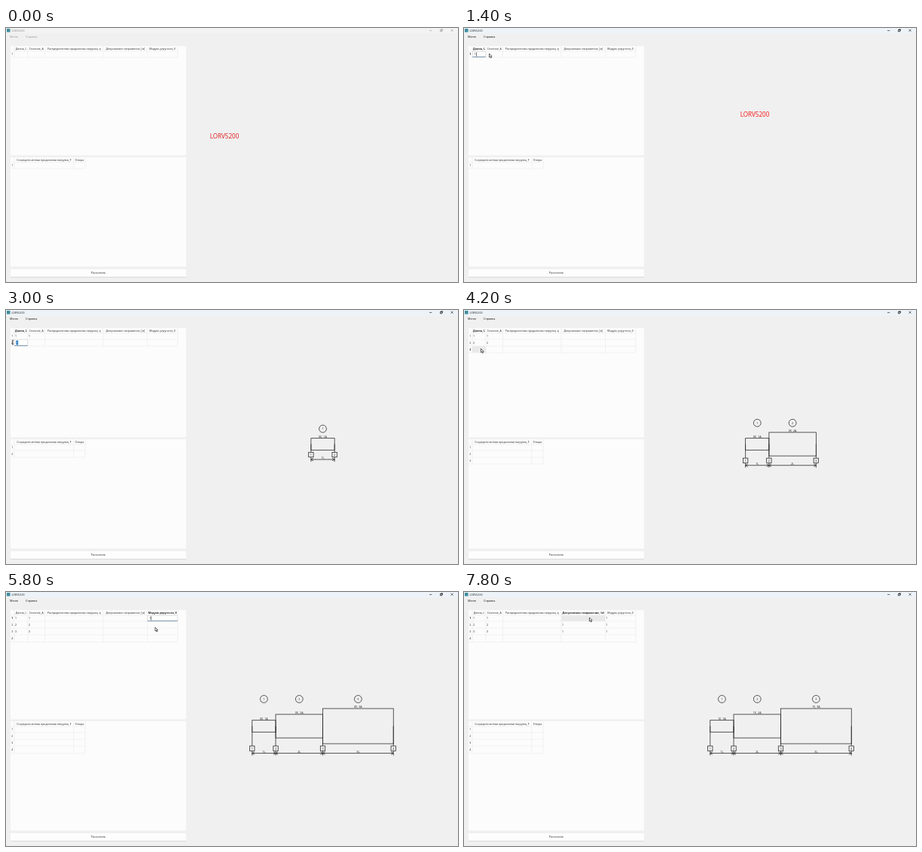
Animation of 600 by 338 pixels, one loop 8000 ms. Source, as an HTML page with a canvas:

```html
<!DOCTYPE html>
<html lang="ru">
<head>
<meta charset="utf-8">
<title>LORV5200</title>
<style>
html, body { margin: 0; width: 100%; height: 100%; overflow: hidden; background: #f0f0f0; }
canvas { display: block; width: 600px; height: 338px; }
</style>
</head>
<body>
<canvas id="stage"></canvas>
<script>
const LOOP = 8000, TICK = 200;
const APP = 'LORV5200';
const canvas = document.getElementById('stage');
const ctx = canvas.getContext('2d');
const ratio = window.devicePixelRatio || 1;
canvas.width = 600 * ratio;
canvas.height = 338 * ratio;

const ROW_EDGES = [7, 15, 24, 33, 42.7];   // below the top of a table
const BARS = {
  top: 24, edges: [11, 29, 51.5, 129, 187.5, 228],
  heads: ['Длина, L', 'Сечение, A', 'Распределенная продольная нагрузка, q',
          'Допускаемое напряжение, [σ]', 'Модуль упругости, E']
};
const NODES = {
  top: 172, edges: [11, 90, 105],
  heads: ['Сосредоточенная продольная нагрузка, F', 'Опора']
};

// [time, row, column, mode]; a typed value is committed by the next step
const STEPS = [
  [1000, 0, 0, 'select'], [1200, 0, 0, 'type'], [1600, 0, 1, 'select'], [1800, 0, 1, 'type'],
  [2000, 0, 1, 'hover'], [2400, 1, 0, 'hover'],
  [2600, 1, 0, 'select'], [3200, 1, 0, 'type'], [3400, 1, 1, 'select'], [3600, 1, 1, 'type'],
  [3800, 1, 1, 'hover'], [4000, 2, 0, 'hover'],
  [4400, 2, 0, 'select'], [4600, 2, 0, 'type'], [4800, 2, 1, 'select'], [5000, 2, 1, 'type'],
  [5200, 2, 1, 'hover'], [5400, 0, 4, 'hover'],
  [5600, 0, 4, 'select'], [5800, 0, 4, 'type'], [6000, 1, 4, 'select'], [6200, 1, 4, 'type'],
  [6400, 2, 4, 'select'], [6600, 2, 4, 'type'], [6800, 2, 3, 'hover'],
  [7000, 2, 3, 'select'], [7200, 2, 3, 'type'], [7400, 1, 3, 'select'], [7600, 1, 3, 'type'],
  [7800, 0, 3, 'hover']
];

// [time, x, y]
const POINTER = [
  [400, 150, 90], [1000, 20, 35], [1200, 21, 35], [1400, 33.5, 34], [2000, 34, 34],
  [2600, 16, 43], [3000, 9, 43], [3400, 33, 43], [3800, 34, 43], [4200, 22.5, 51.5],
  [4600, 23, 52], [4800, 34, 52], [5200, 34, 52], [5600, 200, 34], [5800, 198, 47],
  [6400, 198, 47], [6600, 198, 52], [6800, 170, 53], [7200, 169, 52], [7400, 168, 44],
  [7800, 166.5, 34]
];

const valueFor = (row, col) => col < 2 ? row + 1 : 1;

function stateAt(t) {
  const cells = [0, 1, 2, 3].map(() => []);
  let current = null;
  for (const [start, row, col, mode] of STEPS) {
    if (start > t) break;
    if (current && current.mode === 'type')
      cells[current.row][current.col] = valueFor(current.row, current.col);
    current = { row, col, mode };
  }
  return { cells, current, bars: cells.filter(c => c[1]) };
}

function pointerAt(t) {
  if (t < POINTER[0][0]) return null;
  const i = POINTER.findIndex(p => p[0] > t);
  if (i < 0) return POINTER[POINTER.length - 1].slice(1);
  const [a, ax, ay] = POINTER[i - 1], [b, bx, by] = POINTER[i];
  const k = (t - a) / (b - a);
  return [ax + (bx - ax) * k, ay + (by - ay) * k];
}

function rect(x, y, w, h, color) {
  ctx.fillStyle = color;
  ctx.fillRect(x, y, w, h);
}

function text(str, x, y, { size = 3.55, color = '#222', align = 'center', bold = false } = {}) {
  ctx.font = `${bold ? 'bold ' : ''}${size}px "Open Sans", "Noto Sans", sans-serif`;
  ctx.textAlign = align;
  ctx.fillStyle = color;
  ctx.fillText(str, x, y + size * 0.36);
}

function line(...points) {
  ctx.beginPath();
  points.forEach(([x, y]) => ctx.lineTo(x, y));
  ctx.stroke();
}

function stroke(color, width) {
  ctx.strokeStyle = color;
  ctx.lineWidth = width;
}

function drawWindow(active) {
  const ink = active ? '#111' : '#999';
  rect(0, 0, 600, 338, '#f0f0f0');
  rect(0, 0, 600, 7, active ? '#edf3f8' : '#f3f3f3');
  rect(1, 1, 4.5, 4.5, '#3b8c9c');
  text(APP, 7.5, 3.4, { align: 'left', color: active ? '#222' : '#888' });
  text('Меню', 5, 12, { size: 3.8, align: 'left', color: ink });
  text('Справка', 26, 12, { size: 3.8, align: 'left', color: ink });
  stroke(ink, 0.6);
  line([562, 3.4], [565.3, 3.4]);
  ctx.strokeRect(576.3, 2.4, 2.4, 2.4);
  line([577.2, 1.6], [579.5, 1.6], [579.5, 4]);
  line([590.5, 1.7], [593.5, 4.7]);
  line([593.5, 1.7], [590.5, 4.7]);
  rect(6, 321, 233, 10.5, '#fdfdfd');
  rect(6, 331, 233, 0.7, '#cfcfcf');
  text('Рассчитать', 122.5, 326.2);
}

function drawTable({ top, edges, heads }, rows, current) {
  const last = edges[edges.length - 1];
  rect(6, top, 233, 145.5, '#fcfcfc');
  stroke('#e6e6e6', 0.5);
  for (let r = 0; r <= rows; r++) line([6, top + ROW_EDGES[r]], [last, top + ROW_EDGES[r]]);
  edges.forEach(x => line([x, top], [x, top + ROW_EDGES[rows]]));
  heads.forEach((head, c) => text(head, (edges[c] + edges[c + 1]) / 2, top + 3.6,
    { bold: !!current && current.col === c }));
  for (let r = 0; r < rows; r++)
    text(r + 1, 8.3, rowMiddle(top, r), { bold: !!current && current.row === r });
}

function rowMiddle(top, r) {
  return top + (ROW_EDGES[r] + ROW_EDGES[r + 1]) / 2;
}

function drawCells({ cells, current }) {
  const { top, edges } = BARS;
  if (current) drawCurrent(current);
  cells.forEach((row, r) => row.forEach((value, c) => {
    const editing = current.row === r && current.col === c && current.mode !== 'hover';
    if (!editing) text(value, edges[c] + 1.1, rowMiddle(top, r), { align: 'left' });
  }));
}

function drawCurrent({ row, col, mode }) {
  const x = BARS.edges[col], w = BARS.edges[col + 1] - x;
  const y = BARS.top + ROW_EDGES[row], h = ROW_EDGES[row + 1] - ROW_EDGES[row];
  const middle = y + h / 2;
  if (mode === 'hover') return rect(x, y + 0.3, w, h - 0.6, '#e9e9e9');
  rect(x + 0.3, y + 0.3, w - 0.6, h - 0.6, '#fff');
  stroke('#d0d0d0', 0.5);
  ctx.strokeRect(x + 0.3, y + 0.3, w - 0.6, h - 0.6);
  rect(x + 0.3, y + h - 0.9, w - 0.6, 0.8, '#5f7f9e');
  if (mode === 'select') {
    rect(x + 2.4, middle - 2.8, 2.8, 5.6, '#0f6cbd');
    text(0, x + 2.8, middle, { align: 'left', color: '#fff' });
  } else {
    text(valueFor(row, col), x + 2.8, middle, { align: 'left' });
    rect(x + 5, middle - 2.6, 0.6, 5.2, '#111');
  }
}

function drawDiagram(bars) {
  const unit = 31.25, middle = 178.5;
  const half = Math.max(...bars.map(b => b[1])) * unit / 4;
  const nodeY = middle + half + 6.2, sizeY = nodeY + 6.4;
  const label = { size: 3.8 };
  let x = 420.5 - bars.reduce((sum, b) => sum + b[0], 0) * unit / 2;
  stroke('#222', 0.75);

  const drawNode = (number, nx) => {
    line([nx, middle], [nx, sizeY + 3]);
    rect(nx - 3.2, nodeY - 3.2, 6.4, 6.4, '#f0f0f0');
    ctx.strokeRect(nx - 3.2, nodeY - 3.2, 6.4, 6.4);
    text(number, nx, nodeY, label);
  };

  drawNode(1, x);
  bars.forEach(([length, area, , , modulus = 0], i) => {
    const end = x + length * unit, center = (x + end) / 2, height = area * unit / 2;
    ctx.strokeRect(x, middle - height / 2, end - x, height);
    text(`${modulus}E, ${area}A`, center, middle - height / 2 - 2.5, label);
    ctx.beginPath();
    ctx.arc(center, middle - half - 12.6, 4.9, 0, Math.PI * 2);
    ctx.stroke();
    text(i + 1, center, middle - half - 12.6, label);
    line([x, sizeY], [end, sizeY]);
    line([x + 3, sizeY - 1.8], [x, sizeY], [x + 3, sizeY + 1.8]);
    line([end - 3, sizeY - 1.8], [end, sizeY], [end - 3, sizeY + 1.8]);
    text(`${length}L`, center, sizeY - 2, label);
    drawNode(i + 2, end);
    x = end;
  });
}

function drawPointer([x, y], current) {
  const { edges, top } = BARS;
  const overEditor = current && current.mode !== 'hover' &&
    x > edges[current.col] - 3 && x < edges[current.col + 1] &&
    Math.abs(y - rowMiddle(top, current.row)) < 4.5;
  ctx.save();
  ctx.translate(x, y);
  stroke('#222', 0.7);
  if (overEditor) {
    line([-1.2, -2.8], [1.2, -2.8]);
    line([0, -2.8], [0, 2.8]);
    line([-1.2, 2.8], [1.2, 2.8]);
  } else {
    ctx.fillStyle = '#fff';
    ctx.fill(ARROW);
    ctx.stroke(ARROW);
  }
  ctx.restore();
}
const ARROW = new Path2D('M0 0V5L1.2 4L2.1 5.9L3 5.5L2.1 3.7H3.6Z');

function draw(t) {
  const state = stateAt(t), pointer = pointerAt(t);
  const rows = state.bars.length + 1;
  ctx.setTransform(ratio, 0, 0, ratio, 0, 0);
  drawWindow(t > 0);
  drawTable(BARS, rows, state.current);
  drawTable(NODES, rows, null);
  drawCells(state);
  if (state.bars.length) {
    drawDiagram(state.bars);
  } else {
    const k = t / 1400;
    text(APP, 290 + 96 * k, 144 - 29 * k, { size: 8.1, color: t > 0 ? '#f80c0c' : '#dc1616' });
  }
  if (pointer) drawPointer(pointer, state.current);
}

const began = performance.now();
function frame() {
  const t = (performance.now() - began) % LOOP;
  draw(Math.floor(t / TICK) * TICK);
  requestAnimationFrame(frame);
}
frame();
</script>
</body>
</html>
```
